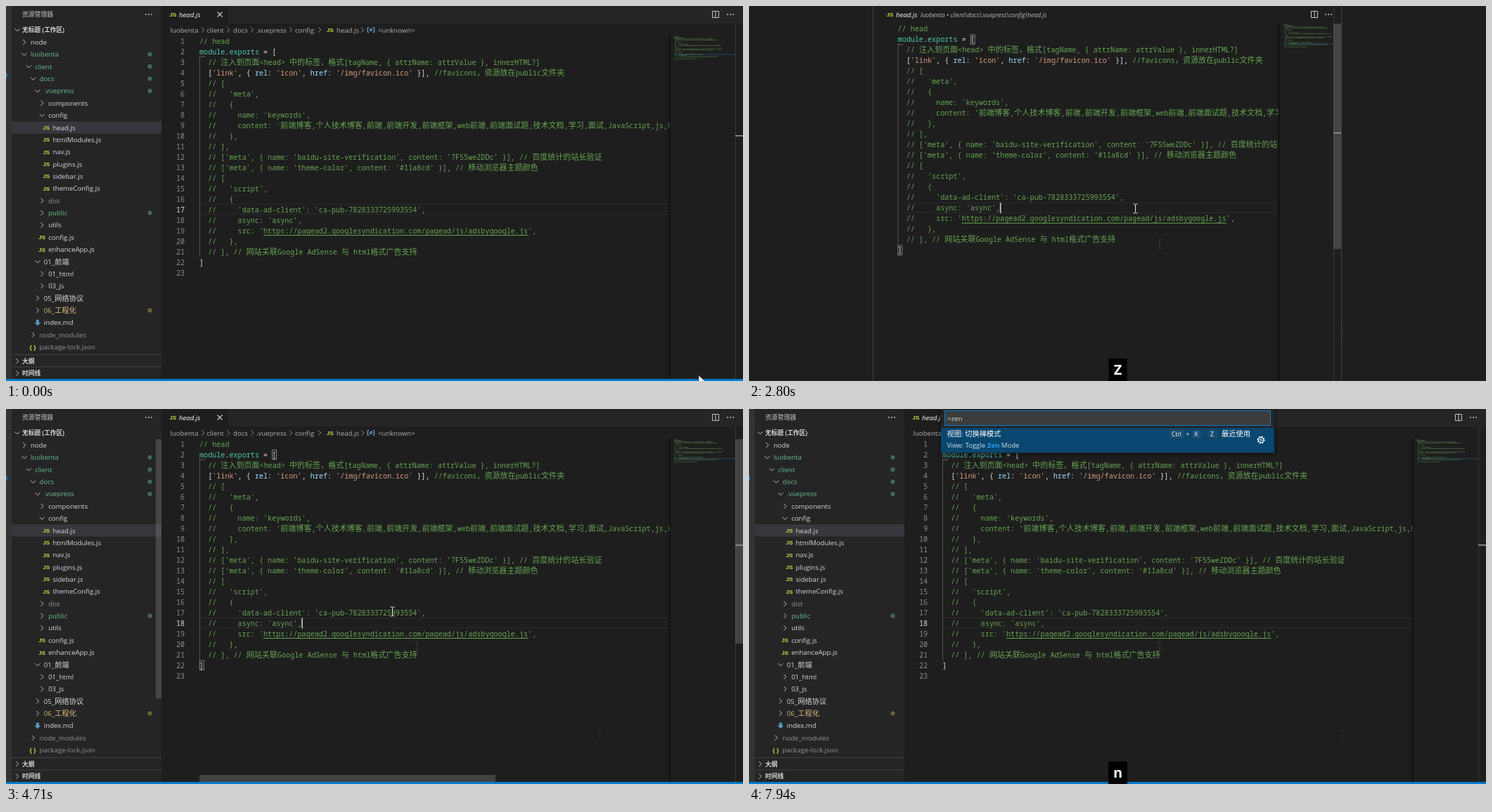
These frames come from a looping animation (1048 by 534 pixels, 8000 ms). An HTML page:

```html
<!DOCTYPE html>
<html lang="zh-CN">
<head>
<meta charset="utf-8">
<title>Zen mode</title>
<style>
html, body { margin: 0; width: 100%; height: 100%; overflow: hidden; background: #1e1e1e; }
svg { display: block; }
text { white-space: pre; font-family: 'Open Sans', 'Noto Sans CJK SC', 'Noto Sans CJK', sans-serif; }
.mono { font-family: 'Noto Sans Mono', 'Noto Sans CJK SC', 'Noto Sans CJK', monospace; font-size: 10.125px; }
.js { font: 700 8px 'Liberation Sans', sans-serif; }
.ui tspan.cjk { font-size: 1.067em; }
.mono tspan.cjk { font-size: 1.0914em; }
</style>
</head>
<body>
<svg id="stage" width="1048" height="534" viewBox="0 0 1048 534"></svg>
<script>
const LOOP = 8000, CW = 6.075, LH = 15;
const NAME = 'luobenta';
const TEXT = '#d8d8d8', COMMENT = '#66a552';
const stage = document.getElementById('stage');

const esc = s => s.replace(/&/g, '&amp;').replace(/</g, '&lt;').replace(/>/g, '&gt;');
const cjk = s => s.replace(/[\u2e80-\u9fff\uff00-\uffef]+/g, m => `<tspan class="cjk">${m}</tspan>`);
const rect = (x, y, w, h, fill, extra = '') =>
  `<rect x="${x}" y="${y}" width="${w}" height="${h}" fill="${fill}" ${extra}/>`;
const txt = (x, cy, s, fill = TEXT, size = 9.62, extra = '') =>
  `<text class="ui" x="${x}" y="${cy + size * .37}" fill="${fill}" font-size="${size}" ${extra}>${cjk(esc(s))}</text>`;
const line = (d, color, w = 1, extra = '') =>
  `<path d="${d}" fill="none" stroke="${color}" stroke-width="${w}" ${extra}/>`;
const chev = (x, y, down, color = '#c5c5c5') => line(down
  ? `M${x - 3.6} ${y - 1.8}l3.6 3.6l3.6 -3.6` : `M${x - 1.8} ${y - 3.6}l3.6 3.6l-3.6 3.6`, color);
const jsIcon = (x, y) => `<text class="js" x="${x}" y="${y + 2.9}" fill="#dcd648">JS</text>`;
const dots = (x, y) => [-4, 0, 4].map(d => `<circle cx="${x + d}" cy="${y}" r="1" fill="#c5c5c5"/>`).join('');
const split = (x, y) => line(`M${x - 4.5} ${y - 4.5}h9v9h-9zM${x} ${y - 4.5}v9`, '#c5c5c5');
const group = (id, body) => `<g id="${id}">${body}</g>`;

// Code
const code = `// head
module.exports = [
  // 注入到页面<head> 中的标签，格式[tagName, { attrName: attrValue }, innerHTML?]
  ['link', { rel: 'icon', href: '/img/favicon.ico' }], //favicons，资源放在public文件夹
  // [
  //   'meta',
  //   {
  //     name: 'keywords',
  //     content: '前端博客,个人技术博客,前端,前端开发,前端框架,web前端,前端面试题,技术文档,学习,面试,JavaScript,js,ES6',
  //   },
  // ],
  // ['meta', { name: 'baidu-site-verification', content: '7F55weZDDc' }], // 百度统计的站长验证
  // ['meta', { name: 'theme-color', content: '#11a8cd' }], // 移动浏览器主题颜色
  // [
  //   'script',
  //   {
  //     'data-ad-client': 'ca-pub-7828333725993554',
  //     async: 'async',
  //     src: 'https://pagead2.googlesyndication.com/pagead/js/adsbygoogle.js',
  //   },
  // ], // 网站关联Google AdSense 与 html格式广告支持
]`.split('\n');

const paint = (s, c) => `<tspan fill="${c}">${s}</tspan>`;
function highlight(s) {
  const cut = s.indexOf('//'), end = cut < 0 ? s.length : cut;
  const head = esc(s.slice(0, end)).replace(/'[^']*'|\w+(?=:)|module|exports/g,
    m => paint(m, m[0] === "'" ? '#d69a80' : /module|exports/.test(m) ? '#4ec9b0' : '#9cdcfe'));
  return head + (cut < 0 ? '' : paint(cjk(esc(s.slice(end))), COMMENT));
}
const codeLines = code.map((s, i) =>
  `<text class="mono" x="0" y="${i * LH + 11}" fill="#dedede">${highlight(s)}</text>`).join('');
const bracket = (col, row) => rect(col * CW + .3, row * LH + .8, 6, 13.4, '#143014', 'fill-opacity=".4" stroke="#8a8a8a" stroke-width=".9"');
const codeBody =
  group('row', line('M0 0H800M0 14H800', '#2b2b2b')) +
  line(`M.5 30V${21 * LH}`, '#606060', .8) +
  group('brackets', bracket(17, 1) + bracket(0, 21)) + codeLines +
  line(`M${15 * CW} 284h${62 * CW}`, COMMENT) +
  [0, 3, 6].map(x => rect(x, 29, 1.4, 1.2, '#9a9a9a')).join('') +
  rect(24 * CW - .5, 17 * LH, 1.6, LH, '#d0d0cc', 'id="caret"');

const miniBody = rect(0, 0, 90, 1.5, '#264f78', 'id="miniRow" fill-opacity=".6"') + code.map((s, i) =>
  [...s.matchAll(/\S+/g)].map(m => rect((m.index * .79).toFixed(2), (i * 1.58 + .2).toFixed(2),
    (m[0].length * .79).toFixed(2), .9, s.includes('//') ? COMMENT : '#a8b8b4', 'fill-opacity=".5"')).join('')).join('');

// Explorer: depth, label, kind (> closed, v open, j script, m markdown, p package), colour, dot
const G = '#68bd8c', Y = '#dcbb7c', D = '#949494', GD = '#426b50', YD = '#6f6030';
const tree = [
  [0, 'node', '>'], [0, NAME, 'v', G, GD], [1, 'client', 'v', G, GD], [2, 'docs', 'v', G, GD],
  [3, '.vuepress', 'v', G, GD], [4, 'components', '>'], [4, 'config', 'v'], [5, 'head.js', 'j'],
  [5, 'htmlModules.js', 'j'], [5, 'nav.js', 'j'], [5, 'plugins.js', 'j'], [5, 'sidebar.js', 'j'],
  [5, 'themeConfig.js', 'j'], [4, 'dist', '>', D], [4, 'public', '>', G, GD], [4, 'utils', '>'],
  [4, 'config.js', 'j'], [4, 'enhanceApp.js', 'j'], [3, '01_前端', 'v'], [4, '01_html', '>'],
  [4, '03_js', '>'], [3, '05_网络协议', '>'], [3, '06_工程化', '>', Y, YD], [3, 'index.md', 'm'],
  [2, 'node_modules', '>', D], [2, 'package-lock.json', 'p', D]];
const treeRow = ([d, label, kind, color, dot], i) => {
  const y = 51.5 + i * 17.36, x = 26 + d * 6.31;
  const icon = kind === 'j' ? jsIcon(x - 5, y)
    : kind === 'm' ? `<path d="M${x - 2} ${y - 4}h4v4h2.5l-4.5 4.5l-4.5 -4.5h2.5z" fill="#519aba"/>`
    : kind === 'p' ? txt(x - 5, y, '{ }', '#dcd648', 8.6, 'font-weight="700"') : chev(x, y, kind === 'v');
  return icon + txt(x + 8.9, y, label, color) +
    (dot ? `<circle cx="204.5" cy="${y}" r="3.1" fill="${dot}"/>` : '');
};
const bold = 'font-weight="700"';
const sidebar = rect(0, 0, 8, 534, '#333333') + '<circle cx="-2" cy="98.5" r="4" fill="#007acc"/>' +
  rect(8, 0, 213, 534, '#252526') + rect(8, 164.4, 213, 17.2, '#37373d') +
  txt(23, 12, '资源管理器', '#c4c4c4', 8.3) + dots(203, 12) +
  chev(16, 34, true) + txt(23, 34, '无标题 (工作区)', TEXT, 8.2, bold) +
  tree.map(treeRow).join('') +
  [[496.5, '大纲'], [514, '时间线']].map(([y, s]) => line(`M8 ${y}H221`, '#414142') +
    chev(16, y + 9, false) + txt(23, y + 9, s, TEXT, 8.2, bold)).join('') +
  rect(213, 43, 8, 369, '#797979', 'id="sideBar" fill-opacity=".4"');

const crumbs = [[233.5, NAME, 280], [285.5, 'client', 316], [323, 'docs', 350], [356, '.vuepress', 405],
  [411, 'config', 446], [470, 'head.js', 507], [529, '<unknown>']];
const header = rect(221, 0, 827, 25, '#252526') + rect(221, 0, 95, 25, '#1e1e1e') +
  jsIcon(232.5, 12) + txt(246, 12, 'head.js', '#fff', 9.62, 'font-style="italic"') +
  line('M300.5 8.5l7 7m0 -7l-7 7', '#d0d0d0', 1.1) + split(1009, 12) + dots(1030, 12) +
  crumbs.map(([x, s, c]) => txt(x, 34, s, '#b2b2b2') + (c ? chev(c, 34, false, '#909090') : '')).join('') +
  jsIcon(456, 34) + line('M516 30.5h-1.7v7h1.7M522 30.5h1.7v7h-1.7M517.5 35.5v-2.5l3 -1v3z', '#75beff');

const numbers = Array.from({ length: 23 }, (_, i) =>
  `<text class="mono" id="n${i + 1}" x="254.2" y="${53.5 + i * LH}" text-anchor="end" fill="#8b8b8b">${i + 1}</text>`).join('');

const zenTitle = jsIcon(195.5, 12) + txt(209, 12, 'head.js', '#fff', 9.62, 'font-style="italic"') +
  txt(244, 12.5, `${NAME} • client\\docs\\.vuepress\\config\\head.js`, '#b8b8b8', 8.75, 'font-style="italic"') +
  split(804, 12) + dots(824, 12);

// Command palette
const dim = '#acacac';
const listItems = [[70.5, '配置显示语言'], [86.5, 'Configure Display Language', dim], [105.5, '“文件操作需要预览”的重置选项'],
  [122, '按降序排列行'], [138.5, 'Sort Lines Descending', dim], [157, '按升序排列行'], [173, 'Sort Lines Ascending', dim],
  [191.5, '帮助: 报告问题...'], [208, 'Help: Report Issue...', dim], [226, '帮助: 报告性能问题...']];
const gear = '<circle cx="728" cy="44" r="3.7" fill="none" stroke="#fff" stroke-width="1.2"/>' +
  '<circle cx="728" cy="44" r="4.8" fill="none" stroke="#fff" stroke-width="1.4" stroke-dasharray="1.9 1.87"/>' +
  '<circle cx="728" cy="44" r="1.3" fill="none" stroke="#fff" stroke-width=".9"/>';
const keyCap = (x, w) => rect(x, 28.5, w, 14, '#808080', 'rx="2" fill-opacity=".12" stroke="#333" stroke-opacity=".4"');
const palette = rect(273, -4, 474, 241, '#252526', 'id="panel" filter="url(#shade)"') +
  rect(278.5, 2.5, 463, 21, '#3c3c3c', 'stroke="#007fd4"') +
  txt(282, 13, '>', TEXT, 9.62, 'id="query"') + rect(288, 7, 1, 12, '#e0e0e0', 'id="queryCaret"') +
  rect(273, 27, 474, 35, '#094771') + txt(281.5, 35.5, '视图: 切换禅模式', '#fff') +
  txt(281.5, 51.5, 'View: Toggle Zen Mode', '#d6e0e8', 9.62, 'id="zenItem"') +
  keyCap(596.5, 23) + keyCap(629.5, 14) + keyCap(652.5, 14) +
  [[601, 'Ctrl'], [621.5, '+'], [633.5, 'K'], [656, 'Z']].map(([x, s]) => txt(x, 35.5, s, '#fff', 8.4)).join('') +
  txt(672, 35.5, '最近使用', '#fff') + gear +
  group('list', listItems.map(([y, s, c]) => txt(281.5, y, s, c)).join('') +
    line('M273 96.5H747', '#454547') + txt(691, 105.5, '其他命令', '#3794ff'));

const beam = 'M-3 -6.5h2l1 1l1 -1h2M0 -5.5v11M-3 6.5h2l1 -1l1 1h2';
const ghost = (id, x, y, o) => `<path id="${id}" d="${beam}" transform="translate(${x} ${y})" fill="none" stroke="#ccc" stroke-opacity="${o}"/>`;

stage.innerHTML =
  '<defs><filter id="shade" x="-10%" y="-10%" width="120%" height="130%"><feDropShadow dx="0" dy="1" stdDeviation="3.5" flood-color="#000" flood-opacity=".7"/></filter></defs>' +
  rect(0, 0, 1048, 534, '#1e1e1e') +
  `<svg id="pane">${group('code', codeBody)}</svg>` +
  rect(0, 0, 3, 534, '#000', 'id="edge" fill-opacity=".32"') +
  `<svg id="mini">${group('miniCode', miniBody)}</svg>` +
  group('ruler', line('M.5 0V534', '#383838') + rect(0, 0, 11, 10, '#797979', 'id="slider" fill-opacity=".42"') +
    rect(0, 0, 11, 1.6, '#979797', 'id="mark"')) +
  group('zen', line('M176.5 0V534M842.5 0V534', '#444')) + group('zenTitle', zenTitle) +
  group('work', header + numbers + rect(275, 521, 421, 10, '#797979', 'id="hbar" fill-opacity=".4"') +
    sidebar + rect(0, 531, 1048, 3, '#007acc')) +
  group('palette', palette) + ghost('ghost1', 844, 464, .08) + ghost('ghost2', 584, 339, .18) +
  group('mouse', `<path id="beam" d="${beam}" fill="none" stroke="#e4e4e4"/>` +
    '<path id="arrow" d="M0 0v12l3 -2.7l2 4.5l2 -1l-2 -4.3h4z" fill="#fff" stroke="#333" stroke-width=".6"/>') +
  group('keys', '');

const el = {};
stage.querySelectorAll('[id]').forEach(e => el[e.id] = e);
const set = (id, attrs) => { for (const k in attrs) el[id].setAttribute(k, attrs[k]); };
const show = (id, on) => el[id].style.display = on ? '' : 'none';
const fade = (id, o) => el[id].style.opacity = o;
const ramp = (t, a, b) => Math.min(1, Math.max(0, (t - a) / (b - a)));
const within = (t, spans) => spans.some(([a, b]) => t >= a && t < b);
const at = (x, y) => ({ transform: `translate(${x} ${y})` });

// Three editor layouts: window, zen with its title, zen full screen
const layouts = {
  work: { pane: [221, 42.5, 722, 489], code: [275, 42.5], mini: [944, 42.5, 93, 480], map: [949.5, 43], ruler: 1037, bar: [43, 334], mark: 193 },
  title: { pane: [177, 25, 576, 509], code: [211.5, 25.2], mini: [754, 25, 77, 500], map: [760.5, 26], ruler: 831, bar: [25, 346], mark: 180 },
  full: { pane: [177, 0, 576, 534], code: [211.5, 1.6], mini: [754, 0, 77, 500], map: [760.5, 2], ruler: 831, bar: [1, 369], mark: 162 }
};
const clip = (id, child, [x, y, width, height], [ox, oy]) => {
  set(id, { x, y, width, height });
  set(child, at(ox - x, oy - y));
};
function layOut(mode, row) {
  const L = layouts[mode];
  clip('pane', 'code', L.pane, L.code);
  clip('mini', 'miniCode', L.mini, L.map);
  set('edge', { x: L.mini[0] - 2, y: L.pane[1] });
  set('ruler', at(L.ruler, 0));
  set('slider', { y: L.bar[0], height: L.bar[1] - L.bar[0] });
  set('mark', { y: row === 17 ? 184 : L.mark });
  set('row', at(0, (row - 1) * LH));
  set('miniRow', { y: (row - 1) * 1.58 });
  show('work', mode === 'work');
  show('zen', mode !== 'work');
  show('zenTitle', mode === 'title');
}

// Keys on screen: label, from, to, box width, box top, font size, baseline
const presses = [
  ['Ctrl + K', 1850, 2800, 99, 500, 22.5, 525], ['Z', 2600, 3410, 26, 502, 20, 525],
  ['Escape', 3810, 4660, 88, 495, 22.1, 520], ['Ctrl + Shift + P', 5930, 6930, 181, 499, 22.5, 525],
  ['z', 6790, 7790, 25, 502, 20, 525], ['e', 6940, 7940, 27, 502, 20, 525], ['n', 7140, 8140, 27, 502, 20, 525]];
let lastKeys = '';
function drawKeys(t) {
  const live = presses.filter(p => t >= p[1] && t < p[2]);
  let x = 524.5 - live.reduce((s, p) => s + p[3], 0) / 2;
  const body = live.map(([s, , , w, top, size, base]) => {
    const box = rect(x, top, w, 534 - top, '#000') +
      `<text x="${x + w / 2}" y="${base}" text-anchor="middle" fill="#fff" font-weight="700" font-size="${size}" word-spacing="2.2">${s}</text>`;
    x += w;
    return box;
  }).join('');
  if (body !== lastKeys) el.keys.innerHTML = lastKeys = body;
}

const path = [[50, 985, 526], [150, 844, 464], [250, 584, 338], [300, 549.5, 288.5]];
function drawMouse(t) {
  const q = Math.floor(t / 50) * 50;
  let [, x, y] = path[0];
  for (let i = 1; i < path.length; i++) {
    const [a, x0, y0] = path[i - 1], [b, x1, y1] = path[i];
    if (q > a) { const k = ramp(q, a, b); x = x0 + (x1 - x0) * k; y = y0 + (y1 - y0) * k; }
  }
  set('mouse', at(x, y));
  show('arrow', q < 100);
  show('beam', q >= 100);
  show('mouse', t < 6490);
  show('ghost1', t >= 200);
  show('ghost2', t >= 300);
}

function drawPalette(t) {
  show('palette', t >= 5980);
  const typed = 'zen'.slice(0, [6790, 6940, 7140].filter(k => t >= k).length), n = typed.length;
  el.query.textContent = '>' + typed;
  set('queryCaret', { x: [288.3, 293.2, 298.8, 305][n] });
  show('queryCaret', within(t, [[5980, 6430], [6790, 7640]]));
  show('list', !n);
  set('panel', { height: n ? 67 : 241 });
  el.zenItem.innerHTML = 'View: Toggle ' + (n ? `<tspan fill="#2a9df4" font-weight="700">${'Zen'.slice(0, n)}</tspan>` : '') + 'Zen'.slice(n) + ' Mode';
}

function draw(t) {
  const mode = within(t, [[2800, 2850], [4410, 4460]]) ? 'title' : within(t, [[2850, 4410]]) ? 'full' : 'work';
  const row = t < 350 ? 17 : 18;
  layOut(mode, row);
  for (const n of [17, 18]) set('n' + n, { fill: row === n ? '#dcdcdc' : '#8b8b8b' });
  show('caret', within(t, [[350, 850], [1350, 1800], [2300, 3310], [3810, 5060], [5560, 5930]]));
  show('brackets', t >= 350 && t < 6840);
  const bars = ramp(t, 80, 300) * (1 - ramp(t, 6790, 7390));
  fade('slider', bars);
  fade('hbar', bars);
  fade('sideBar', t < 4460 ? 0 : 1 - ramp(t, 5410, 5560));
  drawMouse(t);
  drawPalette(t);
  drawKeys(t);
}

const start = performance.now();
function tick() {
  draw((performance.now() - start) % LOOP);
  requestAnimationFrame(tick);
}
tick();
</script>
</body>
</html>
```
